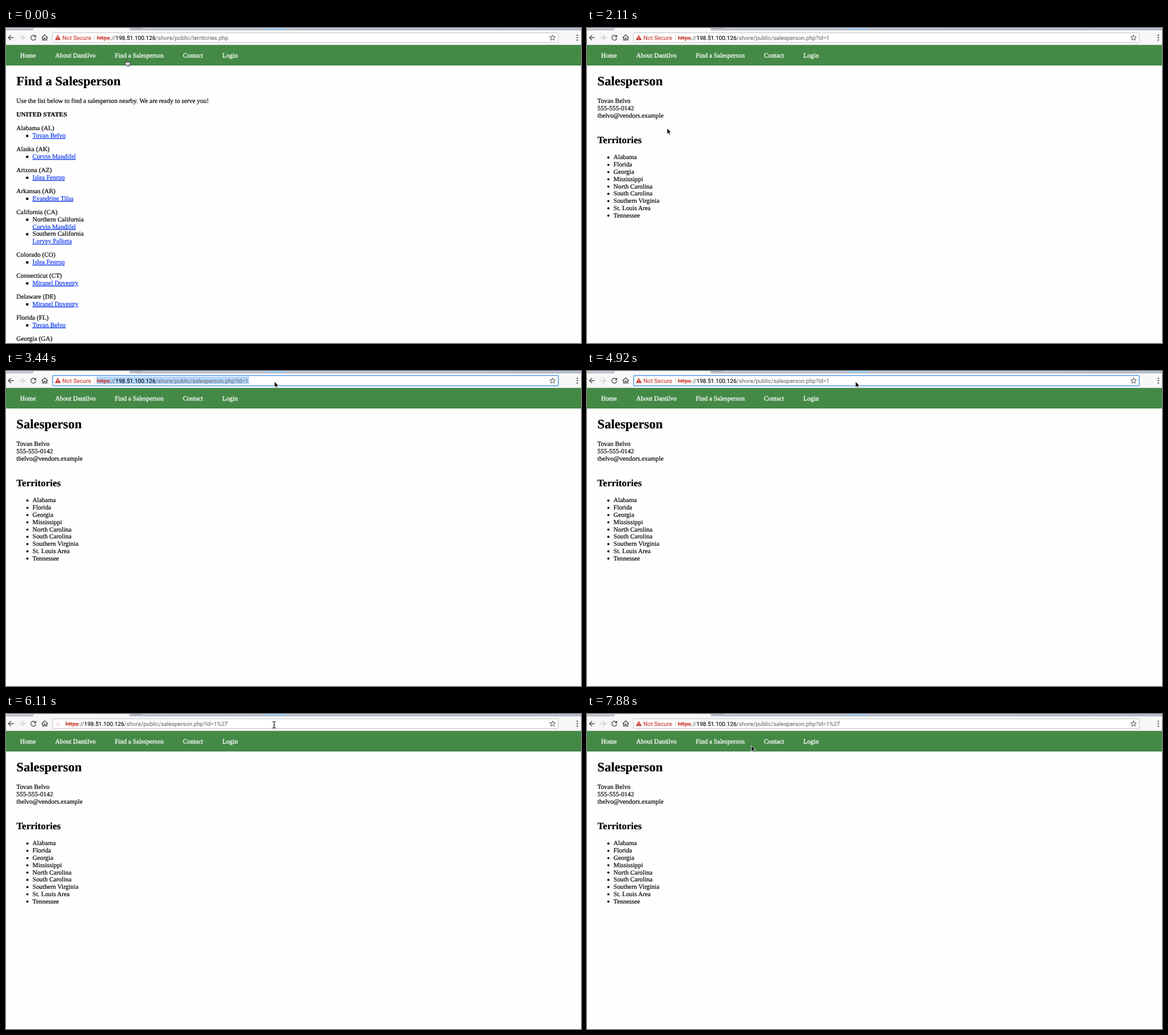
An HTML page that plays this animation: 1010 by 555 pixels, repeating every 8 s.

```html
<!DOCTYPE html>
<html lang="en">
<head>
<meta charset="utf-8">
<title>Territory list</title>
<style>
html, body { margin: 0; width: 100%; height: 100%; overflow: hidden; background: #fefefe; }
svg { display: block; width: 1010px; height: 555px; text-rendering: geometricPrecision; }
.page { font: 11.36px "Liberation Serif", serif; }
.ui { font: 10.1px Roboto, sans-serif; }
text { white-space: pre; }
text, tspan { fill: currentColor; stroke: currentColor; stroke-width: .2; }
.ui text, .ui tspan, text.ui { stroke-width: .12; }
.h1 { font-size: 22.72px; font-weight: 700; }
.h2 { font-size: 17.04px; font-weight: 700; }
.b { font-weight: 700; }
.link { color: #0a35ee; text-decoration: underline; }
.nav { color: #fff; stroke-width: .3; }
.warn { color: #c8382d; font-size: 10.3px; }
.strike { color: #c8382d; text-decoration: line-through; }
.grey { color: #727272; }
.note { color: #686868; font-size: 10.5px; }
.match { font-size: 10.4px; font-weight: 700; letter-spacing: .2px; color: #3160d8; }
.line { fill: none; stroke: #505050; stroke-width: 1.4; }
</style>
</head>
<body>
<svg id="stage" viewBox="0 0 1010 555" xmlns="http://www.w3.org/2000/svg">
  <defs>
    <clipPath id="chipClip"><rect id="chipBox" x="82" y="8" width="72" height="18"/></clipPath>
    <linearGradient id="strip">
      <stop offset="0" stop-color="#c9ced8"/><stop offset=".3" stop-color="#c4cbd8"/>
      <stop offset="1" stop-color="#b9c3d6"/>
    </linearGradient>
    <linearGradient id="shade" x2="0" y2="1">
      <stop stop-color="#bbb"/><stop offset="1" stop-color="#fefefe"/>
    </linearGradient>
    <path id="sheet" class="line" style="stroke-width:1" d="M-2.7-4H.8L2.8-2V4H-2.7ZM.6-4V-1.8H2.8"/>
  </defs>
  <rect width="1010" height="555" fill="#fefefe"/>
  <g id="list" class="page" transform="translate(0 -.35)"></g>
  <g id="person" class="page" transform="translate(0 -.35)"></g>
  <g id="nav" class="page">
    <rect y="30" width="1010" height="36" fill="#448a46"/>
    <rect y="65" width="1010" height="1" fill="#3c7a3e"/>
  </g>
  <g id="chrome">
    <rect width="1010" height="30" fill="#f7f7f7"/>
    <rect width="1010" height="4" fill="url(#strip)"/>
    <rect x="455" width="36" height="3" fill="#a9d0f7"/>
    <path d="M0 3.5H47L49 0M216 0L218 3.5H1010" fill="none" stroke="#9da3ad"/>
    <path d="M49 0H216L218 4H47Z" fill="#f7f7f7"/>
    <path d="M221 0H239V1H221Z" fill="#8d929b"/>
    <path d="M0 29.5H1010" stroke="#d5d5d5"/>
    <path class="line" d="M13.5 17H4.5M8.8 12.4L4.2 17L8.8 21.6"/>
    <path class="line" style="stroke:#ccc" d="M23.5 17H32.5M28.2 12.4L32.8 17L28.2 21.6"/>
    <g id="reload"><path class="line" d="M51.2 14A4.4 4.4 0 1 0 52.4 17.8"/><path d="M53 11.8V16.2H48.6Z" fill="#505050"/></g>
    <path id="stop" class="line" d="M44 13L52 21M52 13L44 21"/>
    <path class="line" d="M62.6 17.3L68 12L73.4 17.3M64.3 16.2V21.4H66.8V18H69.2V21.4H71.7V16.2"/>
    <rect id="field" fill="#fff"/>
    <g fill="#505050"><circle cx="1003.5" cy="12.8" r="1.2"/><circle cx="1003.5" cy="17" r="1.2"/><circle cx="1003.5" cy="21.2" r="1.2"/></g>
    <path id="star" class="line" style="stroke-width:1" d="M960 12L961.4 15.4L965 15.6L962.2 17.9L963.1 21.5L960 19.5L956.9 21.5L957.8 17.9L955 15.6L958.6 15.4Z"/>
    <rect id="mark" y="10" height="13" fill="#b3d6fd"/>
    <g id="chip" class="ui">
      <path d="M91 12L96.2 21.3H85.8Z" fill="#c8382d"/>
      <path d="M91 15V18M91 19V20.2" stroke="#fff" stroke-width="1.1"/>
      <g id="label" clip-path="url(#chipClip)"><text x="99" y="20.5" class="warn">Not Secure</text></g>
      <path id="rule" d="M155.5 12V22" stroke="#ccc"/>
    </g>
    <use id="doc" href="#sheet" x="90.5" y="17"/>
    <text id="url" class="ui" y="20.5"></text>
    <rect id="caret" y="11" width="1" height="12" fill="#111"/>
  </g>
  <g id="menu" class="ui">
    <rect y="30" width="1010" height="42" fill="#fff"/>
    <path d="M0 30.5H1010" stroke="#ccc"/>
    <rect y="33" width="1010" height="18" fill="#e9e9e9"/>
    <rect y="71.5" width="1010" height="3.5" fill="url(#shade)"/>
    <use href="#sheet" x="90.5" y="42.5"/>
    <circle class="line" style="stroke-width:1.1" cx="89.6" cy="59" r="2.8"/>
    <path class="line" d="M91.7 61.1L95 64.3"/>
  </g>
  <g id="cursor" stroke-linejoin="round">
    <path id="arrow" d="M.5 .5V11L3 8.8L4.6 12.4L6.4 11.6L4.8 8.1H8Z" fill="#111" stroke="#fff" stroke-width=".8"/>
    <g id="beam" fill="none" stroke="#111" stroke-width="1.1"><path d="M-3-5.5Q0-5.8 0-4V4Q0 5.8-3 5.5M3-5.5Q0-5.8 0-4M0 4Q0 5.8 3 5.5M-1.5 1H1.5"/></g>
    <g id="hand" stroke="#111" stroke-width=".9">
      <path fill="#fff" d="M2.6 8V1.8Q3.4 .2 4.3 1.8V5.4Q5.4 4.4 6.3 5.6Q7.5 4.9 8.3 6.2Q9.7 5.7 10.2 7V9.6L9.2 12.8H4.3L.8 8.8Q.4 7 2 7.4Z"/>
      <path d="M4.3 5.2V8M6.3 5.6V8M8.3 6.2V8M5.3 9.6V11.6M6.8 9.6V11.6M8.2 9.6V11.6" stroke-width=".7"/>
    </g>
  </g>
</svg>
<script>
const $ = id => document.getElementById(id);
const show = (id, on) => $(id).style.display = on ? '' : 'none';
const put = (id, attrs) => { for (const k in attrs) $(id).setAttribute(k, attrs[k]); };
const add = (id, markup) => $(id).insertAdjacentHTML('beforeend', markup);
const text = (x, y, s, cls = '') => `<text x="${x}" y="${y}" class="${cls}">${s}</text>`;

const LINE = 12.78, GAP = 11.36, LOOP = 8000;
const SCHEME = 'https', HOST = '198.51.100.126', ROOT = '/shore/public/';
const LISTING = ROOT + 'territories.php', PERSON = ROOT + 'salesperson.php?id=1';
const [TB, CM, IF, ET, LP, MD] = ['Tovan Belvo', 'Corvin Mandifel', 'Islea Fenrop',
  'Evandrine Tilsa', 'Lorvey Palketa', 'Miranel Dovestry'];

[[24.7, 'Home'], [86.5, 'About Dantilvo'], [191, 'Find a Salesperson'], [310.7, 'Contact'], [380, 'Login']]
  .forEach(([x, s]) => add('nav', text(x, 52.3, s, 'nav')));

function buildList() {
  const states = [['Alabama (AL)', TB], ['Alaska (AK)', CM], ['Arizona (AZ)', IF], ['Arkansas (AR)', ET],
    ['California (CA)', 'Northern California', CM, 'Southern California', LP],
    ['Colorado (CO)', IF], ['Connecticut (CT)', MD], ['Delaware (DE)', MD], ['Florida (FL)', TB], ['Georgia (GA)']];
  add('list', text(18.3, 101.4, 'Find a Salesperson', 'h1')
    + text(18.3, 132.4, 'Use the list below to find a salesperson nearby. We are ready to serve you!')
    + text(18.3, 156.5, 'UNITED STATES', 'b'));
  let y = 180.7;
  for (const [name, ...rows] of states) {
    add('list', text(18.3, y, name));
    rows.forEach((row, i) => {
      y += LINE;
      const isLink = rows.length < 2 || i % 2;
      add('list', text(46.6, y, row, isLink ? 'link' : ''));
      if (i % 2 === 0) add('list', `<rect x="35.3" y="${y - 5}" width="4" height="4"/>`);
    });
    y += LINE + GAP;
  }
}

function buildPerson() {
  add('person', text(18.3, 101.4, 'Salesperson', 'h1') + text(18.3, 203.6, 'Territories', 'h2'));
  [TB, '555-555-0142', 'tbelvo@vendors.example'].forEach((s, i) =>
    add('person', text(18.3, 132.4 + i * LINE, s)));
  ['Alabama', 'Florida', 'Georgia', 'Mississippi', 'North Carolina', 'South Carolina',
    'Southern Virginia', 'St. Louis Area', 'Tennessee'].forEach((s, i) => {
    const y = 231.8 + i * LINE;
    add('person', text(46.6, y, s) + `<circle cx="37.6" cy="${y - 3.2}" r="1.9"/>`);
  });
}

buildList();
buildPerson();
const address = SCHEME + '://' + HOST + PERSON;
add('menu', text(100, 46, address + '%27', 'match') + text(414, 46, '- Salesperson: ' + TB, 'note')
  + text(100, 63.8, address + "'") + text(372, 63.8, '- Default Search', 'note'));

// Pointer stops: time, x, y, shape
const moves = [
  [0, 208, 54, 'hand'], [470, 188, 92, 'arrow'], [620, 138, 155, 'arrow'], [770, 96, 198, 'arrow'],
  [920, 82, 190, 'hand'], [1070, 73, 184.5, 'hand'],
  [2110, 140, 176, 'arrow'], [2260, 228, 156, 'arrow'], [2400, 290, 142, 'arrow'],
  [2700, 372, 92, 'arrow'], [2850, 440, 46, 'arrow'], [2990, 467, 25, 'beam'], [3140, 471, 20, 'beam'],
  [3440, 471, 18, 'arrow'], [5960, 471, 19, 'beam'],
  [6700, 432, 84, 'arrow'], [6850, 356, 168, 'arrow'], [6990, 325, 194, 'arrow'],
  [7290, 240, 168, 'arrow'], [7440, 122, 128, 'arrow'], [7590, 58, 84, 'arrow'],
  [7730, 178, 52, 'arrow'], [7880, 288, 55, 'arrow']
];

// Browser state; each entry overrides the ones before it
const events = [
  [0, { page: 'list', path: LISTING, busy: false, focus: false, edit: false, menu: false, mark: null, caret: 0, x: 159.5, chip: 1 }],
  [150, { busy: true }],
  [470, { busy: false }],
  [1520, { busy: true }],
  [1660, { busy: false, page: 'person', path: PERSON }],
  [3290, { focus: true }],
  [3440, { mark: [159, 427] }],
  [3880, { mark: [422, 427] }],
  [4470, { mark: null, caret: 426 }],
  [4920, { caret: 0 }],
  [5220, { edit: true, menu: true, path: PERSON + "'", x: 100, chip: 0, caret: 368.5 }],
  [5660, { caret: 0 }],
  [5960, { focus: false, menu: false, path: PERSON + '%27' }],
  [6110, { edit: false, x: 104.5, chip: .13 }],
  [6250, { x: 139, chip: .65 }],
  [6400, { x: 159.5, chip: 1 }]
];

function drawUrl(s) {
  const span = (cls, str) => `<tspan class="${cls}">${str}</tspan>`;
  const head = s.edit ? span('grey', SCHEME + '://') : span('strike', SCHEME) + span('grey', '://');
  put('url', { x: s.x });
  $('url').innerHTML = head + span('', HOST) + span('grey', s.path);
}

function drawState(s) {
  show('list', s.page === 'list');
  show('person', s.page === 'person');
  show('reload', !s.busy);
  show('stop', s.busy);
  show('menu', s.menu);
  show('star', !s.menu);
  show('doc', s.edit);
  show('chip', !s.edit);
  show('label', s.x > 110);
  show('rule', s.x > 110);
  put('chip', { opacity: s.chip });
  put('chipBox', { width: Math.max(0, s.x - 87) });
  put('rule', { transform: `translate(${s.x - 159.5} 0)` });
  put('field', s.focus
    ? { x: 82, y: 8, width: 888, height: 18, rx: 1.5, stroke: '#7fb2ec', 'stroke-width': 2 }
    : { x: 81.5, y: 8.5, width: 888.5, height: 17, rx: 2, stroke: '#c3c3c3', 'stroke-width': 1 });
  const [a, b] = s.mark || [0, 0];
  put('mark', { x: a, width: b - a });
  put('caret', { x: s.caret });
  show('caret', s.caret);
  drawUrl(s);
}

let shown = -1;
function render(t) {
  const past = events.filter(e => e[0] <= t);
  if (past.length !== shown) {
    shown = past.length;
    drawState(Object.assign({}, ...past.map(e => e[1])));
  }
  const [, x, y, shape] = moves.filter(m => m[0] <= t).pop();
  put('cursor', { transform: `translate(${x} ${y})` });
  ['arrow', 'beam', 'hand'].forEach(id => show(id, id === shape));
}

const start = performance.now();
function tick() {
  render((performance.now() - start) % LOOP);
  requestAnimationFrame(tick);
}
tick();
</script>
</body>
</html>
```
